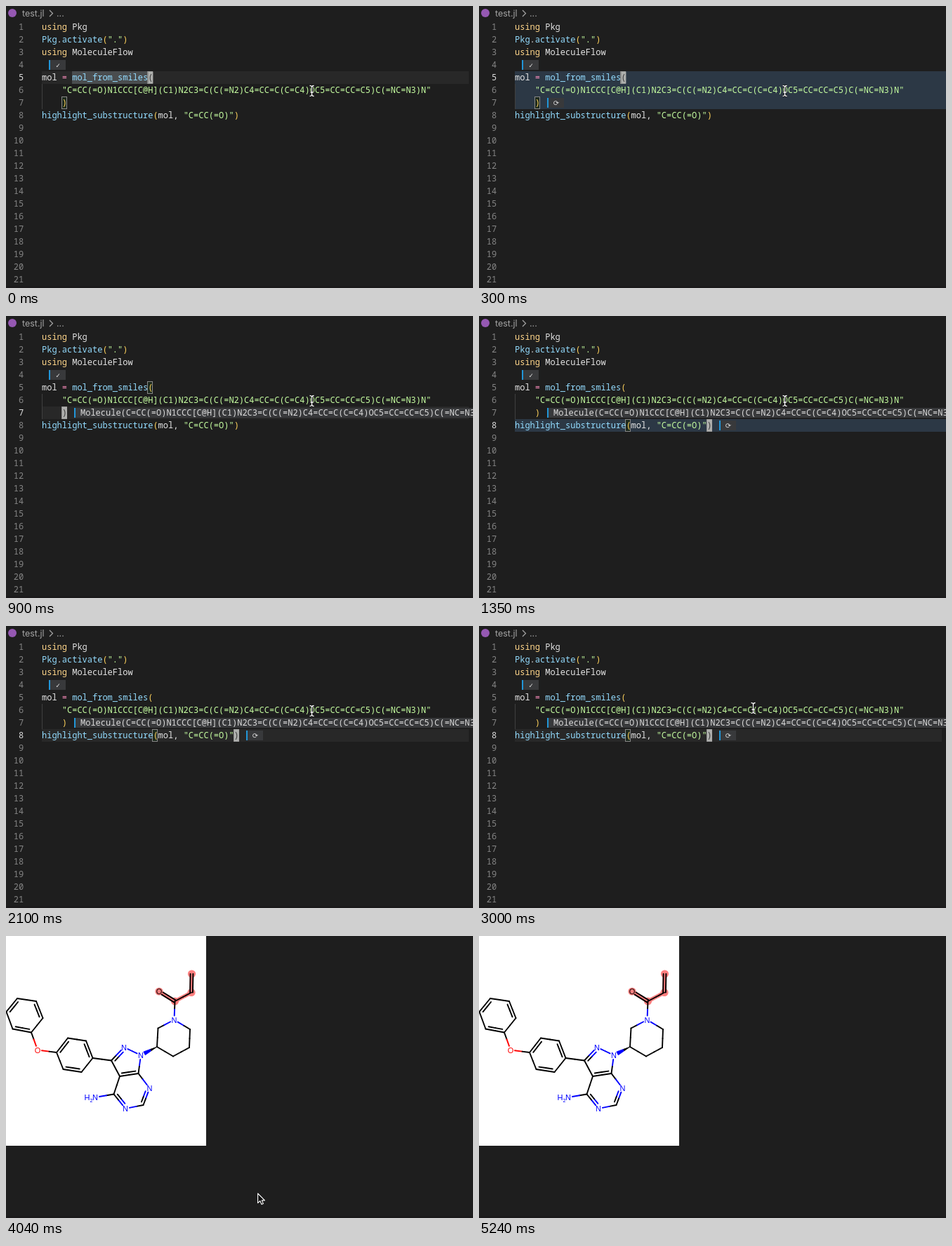
An HTML page that plays this animation: 665 by 402 pixels, repeating every 5.69 s.

```html
<!DOCTYPE html>
<html lang="en">
<head>
<meta charset="utf-8">
<title>Molecule highlight</title>
<style>
html, body { margin: 0; width: 100%; height: 100%; overflow: hidden; background: #1e1e1e; }
svg { display: block; width: 665px; height: 402px; }
text { white-space: pre; }
.code { font: 500 12px "Noto Sans Mono", "Liberation Mono", monospace; }
.ui { font: 12.5px Inter, "Open Sans", sans-serif; }
.mark { font: 10px "DejaVu Sans Mono", "DejaVu Sans", monospace; }
.atom { font: 11px "Liberation Sans", Arial, sans-serif; }
</style>
</head>
<body>
<svg id="stage" viewBox="0 0 665 402"></svg>
<script>
(() => {
const LOOP = 5690, LEFT = 51, CHAR = 7.2, ROW = 18;
const stage = document.getElementById("stage");

function el(tag, attrs, parent = stage, text) {
  const node = document.createElementNS("http://www.w3.org/2000/svg", tag);
  for (const key in attrs) node.setAttribute(key, attrs[key]);
  if (text !== undefined) node.textContent = text;
  parent.appendChild(node);
  return node;
}
const group = (parent = stage) => el("g", {}, parent);
const rect = (x, y, width, height, fill, parent) =>
  el("rect", { x, y, width, height, fill }, parent);
const show = (node, on) => node.setAttribute("visibility", on ? "inherit" : "hidden");
const rowTop = line => 21 + (line - 1) * ROW;
const baseline = line => rowTop(line) + 13;
const column = i => LEFT + i * CHAR;

// ---------- editor ----------
const PLAIN = "#e4e4e4", KEY = "#ffd68a", CALL = "#93dcff", STR = "#c6ffa1",
      OP = "#ff8fc0", GOLD = "#ffd35c";
const smiles = "C=CC(=O)N1CCC[C@H](C1)N2C3=C(C(=N2)C4=CC=C(C=C4)OC5=CC=CC=C5)C(=NC=N3)N";
const source = {
  1: [[KEY, "using"], [PLAIN, " Pkg"]],
  2: [[CALL, "Pkg"], [PLAIN, "."], [CALL, "activate"], [GOLD, "("], [STR, '"."'], [GOLD, ")"]],
  3: [[KEY, "using"], [PLAIN, " MoleculeFlow"]],
  5: [[PLAIN, "mol "], [OP, "="], [CALL, " mol_from_smiles"], [GOLD, "("]],
  6: [[STR, `    "${smiles}"`]],
  7: [[GOLD, "    )"]],
  8: [[CALL, "highlight_substructure"], [GOLD, "("], [PLAIN, "mol, "],
      [STR, '"C=CC(=O)"'], [GOLD, ")"]]
};

rect(0, 0, 665, 402, "#1e1e1e");
rect(0, 399, 665, 3, "#1b1a1b");
const editor = group();

el("circle", { cx: 9, cy: 10, r: 6, fill: "#9558b2" }, editor);
el("text", { x: 23, y: 15, fill: "#a5a5a5", class: "ui" }, editor, "test.jl");
el("path", { d: "M62 6l4.5 4.5l-4.5 4.5", fill: "none", stroke: "#a5a5a5", "stroke-width": 1.2 }, editor);
el("text", { x: 72, y: 15, fill: "#a5a5a5", class: "ui" }, editor, "...");

const activeRow = rect(LEFT, 0, 608, ROW, "#282828", editor);
const wordMark = rect(94, rowTop(5), 108.5, ROW, "#4a4d4f", editor);
const flashBlock = rect(LEFT, rowTop(5), 614, 3 * ROW, "#2c3845", editor);
const flashLine = rect(LEFT, rowTop(8), 614, ROW, "#2c3845", editor);
rect(LEFT, rowTop(6), 1, 2 * ROW, "#404040", editor);

const boxes = [0, 1].map(() => el("rect", {
  width: 7, height: 17, fill: "#1e2a1e", stroke: "#888", "stroke-width": 1
}, editor));

const numbers = [];
for (let n = 1; n <= 21; n++) {
  numbers[n] = el("text", { x: 25.2, y: baseline(n), "text-anchor": "end", class: "code" }, editor, n);
}
for (const line in source) {
  const row = el("text", { x: LEFT, y: baseline(line), class: "code" }, editor);
  for (const [fill, text] of source[line]) el("tspan", { fill }, row, text);
}

function badge(line, x, width) {
  const g = group(editor);
  rect(x, rowTop(line) + 2, width, 14, "#38393b", g);
  rect(x, rowTop(line) + 2, 2, 14, "#2196d8", g);
  return g;
}
function markBadge(line, x, mark) {
  const g = badge(line, x, 24);
  el("text", { x: x + 13, y: baseline(line), "text-anchor": "middle", fill: "#dcdcdc", class: "mark" }, g, mark);
  return g;
}
markBadge(4, 61, "✓");
const spin7 = markBadge(7, 97, "⟳");
const spin8 = markBadge(8, 342, "⟳");
const result = badge(7, 97, 568);
el("text", { x: 106, y: baseline(7), fill: "#dcdcdc", class: "code" }, result, `Molecule(${smiles})`);

const block = group(editor);
const blockRect = rect(0, 0, 7.2, 17, "#aeafad", block);
const blockChar = el("text", { fill: "#3a3a3a", class: "code" }, block);

// ---------- molecule ----------
const drawing = group();
rect(0, 0, 285, 299, "#fff", drawing);
const BLACK = "#000", BLUE = "#0000ff", RED = "#ff0000", PINK = "#ff7f7f";

const lerp = (a, b, t) => [a[0] + (b[0] - a[0]) * t, a[1] + (b[1] - a[1]) * t];
const shift = (p, v) => [p[0] + v[0], p[1] + v[1]];
const flip = v => v.map(n => -n);
function normal(a, b, size) {
  const dx = b[0] - a[0], dy = b[1] - a[1], k = size / Math.hypot(dx, dy);
  return [-dy * k, dx * k];
}

function stroke(a, b, color, width = 1.9) {
  el("line", { x1: a[0], y1: a[1], x2: b[0], y2: b[1], stroke: color,
    "stroke-width": width, "stroke-linecap": "round" }, drawing);
}
// Each half of a bond takes the colour of its own atom.
function halves(a, b, ca, cb) {
  const mid = lerp(a, b, 0.5);
  stroke(a, mid, ca);
  stroke(mid, b, cb);
}
const atoms = {
  p0: [16, 89], p1: [43, 93], p2: [52.5, 117], p3: [36, 137.5], p4: [9.5, 132.5], p5: [0.5, 108],
  o: [45, 162.5],
  q0: [72, 166], q1: [88, 145.5], q2: [114, 149.5], q3: [123.5, 174], q4: [107.5, 194], q5: [81.5, 190],
  z0: [150, 177.5], n1: [168, 158.5], n2: [192, 170], z1: [188.5, 196], z2: [162, 200],
  n3: [204.5, 217], y0: [195.5, 241], n4: [170, 246], y1: [153.5, 225.5], n5: [127, 230],
  n6: [239.5, 119.5], r0: [262, 133], r1: [261, 159], r2: [238, 171.5], r3: [215, 158], r4: [216.5, 131.5],
  c0: [240.5, 93], oh: [218, 79], c1: [264, 80.5], c2: [264.5, 54]
};
const tint = id => id[0] === "n" ? BLUE : id === "o" ? RED : BLACK;
const labelled = id => tint(id) !== BLACK;

function bond(i, j, center) {
  const A = atoms[i], B = atoms[j], gap = 6 / Math.hypot(B[0] - A[0], B[1] - A[1]);
  const a = labelled(i) ? lerp(A, B, gap) : A;
  const b = labelled(j) ? lerp(B, A, gap) : B;
  halves(a, b, tint(i), tint(j));
  if (!center) return;
  let side = normal(A, B, 4);
  const mid = lerp(A, B, 0.5);
  if ((center[0] - mid[0]) * side[0] + (center[1] - mid[1]) * side[1] < 0) side = flip(side);
  const cut = (id, p, q) => lerp(p, q, labelled(id) ? gap : 0.13);
  halves(shift(cut(i, A, B), side), shift(cut(j, B, A), side), tint(i), tint(j));
}
// A star after an atom doubles the bond that leaves it.
function ring(path) {
  const marks = path.split(" "), ids = marks.map(m => m.replace("*", ""));
  const sum = ids.reduce((s, id) => shift(s, atoms[id]), [0, 0]);
  const center = sum.map(v => v / ids.length);
  marks.forEach((m, k) => bond(ids[k], ids[(k + 1) % ids.length], m.endsWith("*") && center));
}
function twin(i, j, trim = 0) {
  const side = normal(atoms[i], atoms[j], 1.9), end = lerp(atoms[j], atoms[i], trim);
  for (const v of [side, flip(side)]) stroke(shift(atoms[i], v), shift(end, v), BLACK);
}

for (const [i, j] of [["oh", "c0"], ["c0", "c1"], ["c1", "c2"]]) stroke(atoms[i], atoms[j], PINK, 5.5);
for (const id of ["oh", "c0", "c1", "c2"]) {
  el("circle", { cx: atoms[id][0], cy: atoms[id][1], r: 5.6, fill: PINK }, drawing);
}
ring("p0 p1* p2 p3* p4 p5*");
ring("q0* q1 q2* q3 q4* q5");
ring("z0* n1 n2 z1* z2");
ring("n6 r0 r1 r2 r3 r4");
const pyrimidine = [179, 221];
for (const [i, j, center] of [["z1", "n3"], ["n3", "y0", pyrimidine], ["y0", "n4"],
  ["n4", "y1", pyrimidine], ["y1", "z2"], ["p3", "o"], ["o", "q0"], ["q3", "z0"],
  ["y1", "n5"], ["n6", "c0"], ["c0", "c1"]]) bond(i, j, center);
twin("c0", "oh", 0.2);
twin("c1", "c2");

function wedge(from, to, t0, t1, color) {
  const a = lerp(from, to, t0), b = lerp(from, to, t1);
  const u = normal(from, to, 3.4 * t0), v = normal(from, to, 3.4 * t1);
  const points = [shift(a, u), shift(b, v), shift(b, flip(v)), shift(a, flip(u))].join(" ");
  el("polygon", { points, fill: color, stroke: color, "stroke-width": 0.8 }, drawing);
}
wedge(atoms.r3, atoms.n2, 0, 0.4, BLACK);
wedge(atoms.r3, atoms.n2, 0.4, 0.78, BLUE);

for (const id of ["o", "oh", "n1", "n2", "n3", "n4", "n5", "n6"]) {
  el("text", { x: atoms[id][0], y: atoms[id][1] + 4, "text-anchor": "middle", fill: tint(id),
    class: "atom" }, drawing, id[0].toUpperCase());
}
el("text", { x: 111.5, y: 234, fill: BLUE, class: "atom" }, drawing, "H");
el("text", { x: 119.5, y: 237, fill: BLUE, class: "atom", style: "font-size:7px" }, drawing, "2");

// ---------- pointers ----------
const beam = group();
const beamPath = "M-3 -7.5Q0 -7.5 0 -5Q0 -7.5 3 -7.5M0 -5V5M-3 7.5Q0 7.5 0 5Q0 7.5 3 7.5M-2 2H2";
for (const [color, width] of [["#111", 3], ["#fff", 1.3]]) {
  el("path", { d: beamPath, fill: "none", stroke: color, "stroke-width": width }, beam);
}
const arrow = el("path", {
  d: "M.6 1V14.6L3.8 11.7L6 16.6L8.4 15.6L6.3 10.9H10.4Z",
  fill: "#111", stroke: "#fff", "stroke-width": 1.1, "stroke-linejoin": "round"
});

// ---------- timeline ----------
const rowSteps = [[0, 5], [750, 6], [900, 7], [1050, 8]];
const blockSteps = [[0, 5, 21, "("], [600], [750, 6, 76, '"'], [900, 7, 4, ")"], [1050, 8, 38, ")"],
  [1500], [2100, 8, 38, ")"], [2550], [3000, 8, 38, ")"], [3600]];
const beamSteps = [[0, 435.5, 121], [2850, 427.5, 121], [3000, 390.5, 117], [3450, 384.5, 173],
  [3600, 369.5, 320], [3750, 359.5, 368], [3890]];
const arrowSteps = [[0], [3890, 358, 366], [4190, 358, 362], [4340, 358, 361], [5090, 432, 389], [5240]];
const at = (steps, t) => steps.filter(s => s[0] <= t).pop();
const within = (t, a, b) => t >= a && t < b;

function place(node, [, x, y]) {
  show(node, x !== undefined);
  if (x !== undefined) node.setAttribute("transform", `translate(${x} ${y})`);
}

function draw(t) {
  show(editor, t < 3890);
  show(drawing, t >= 4040);

  const row = at(rowSteps, t)[1];
  activeRow.setAttribute("y", rowTop(row));
  for (let n = 1; n <= 21; n++) numbers[n].setAttribute("fill", n === row ? "#e0e0e0" : "#858585");

  show(wordMark, t < 750);
  show(flashBlock, within(t, 300, 600));
  show(flashLine, within(t, 1350, 1500));
  show(spin7, within(t, 300, 750));
  show(result, t >= 750);
  show(spin8, t >= 1350);

  const pair = t < 1050 ? [[5, 21], [7, 4]] : [[8, 22], [8, 38]];
  boxes.forEach((box, k) => {
    box.setAttribute("x", Math.round(column(pair[k][1])) - 0.5);
    box.setAttribute("y", rowTop(pair[k][0]) + 0.5);
  });

  const [, line, index, char] = at(blockSteps, t);
  show(block, line);
  if (line) {
    blockRect.setAttribute("x", column(index));
    blockRect.setAttribute("y", rowTop(line) + 0.5);
    blockChar.setAttribute("x", column(index));
    blockChar.setAttribute("y", baseline(line));
    blockChar.textContent = char;
  }
  place(beam, at(beamSteps, t));
  place(arrow, at(arrowSteps, t));
}

const start = performance.now();
function tick() {
  draw((performance.now() - start) % LOOP);
  requestAnimationFrame(tick);
}
draw(0);
requestAnimationFrame(tick);
})();
</script>
</body>
</html>
```
